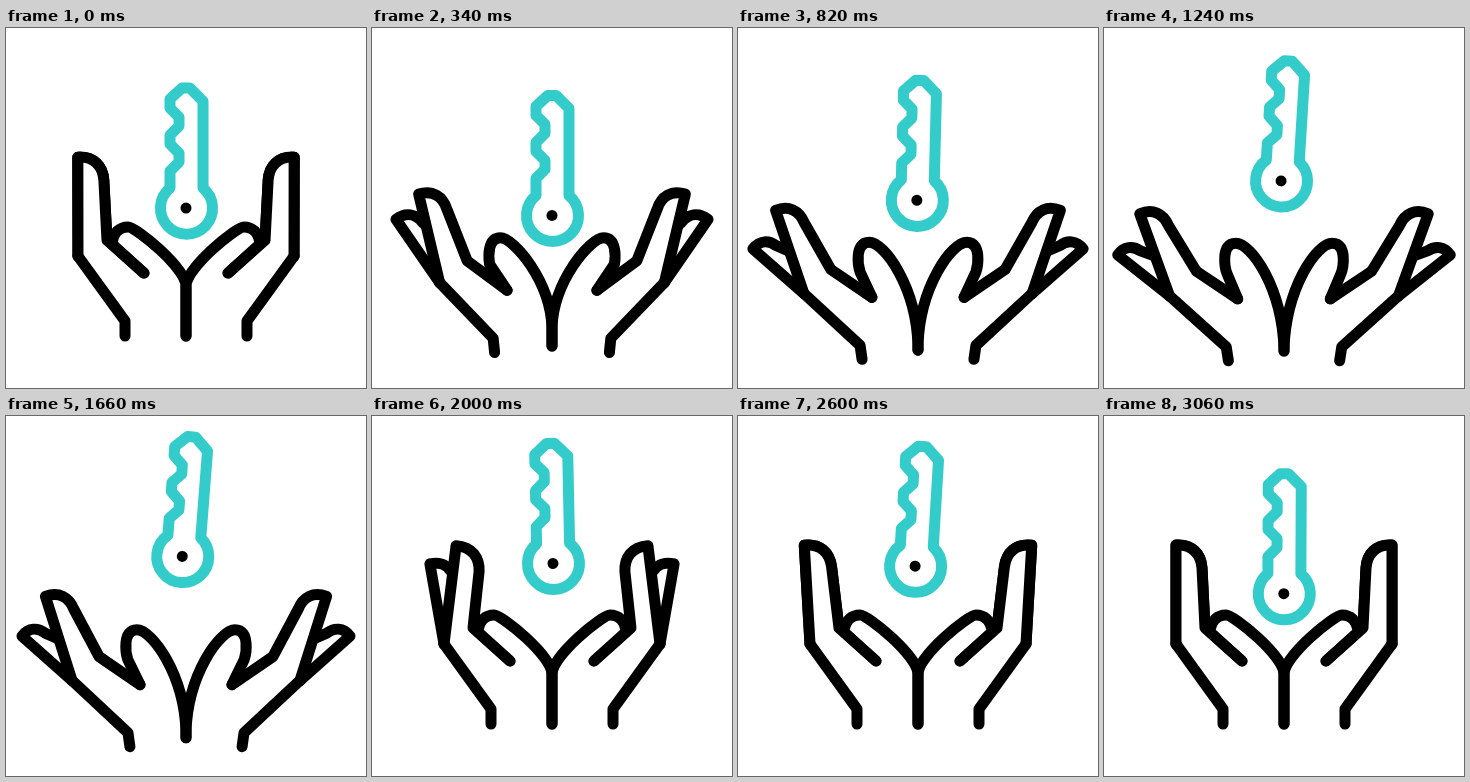
An HTML page for the animation above (3.08 s loop, 360 by 360 pixels).

```html
<!DOCTYPE html>
<html>
<head>
<meta charset="utf-8">
<style>
html, body { margin: 0; width: 100%; height: 100%; overflow: hidden; background: #fff; }
svg { display: block; width: 100vw; height: 100vh; }
path { fill: none; stroke: #000; stroke-width: 11; stroke-linecap: round; stroke-linejoin: round; }
#front { fill: #fff; }
#shape { stroke: #34cccb; }
</style>
</head>
<body>
<svg viewBox="0 0 360 360">
  <g id="hand"><path id="back"/><path id="front"/><path id="palm"/></g>
  <use href="#hand" transform="matrix(-1 0 0 1 360 0)"/>
  <g id="key"><path id="shape"/><circle cx="180" cy="180" r="5.5"/></g>
</svg>
<script>
const LOOP = 3080;
const $ = id => document.getElementById(id);
const set = (id, d) => $(id).setAttribute("d", d);

const teeth = "l9-9v-9l-9-9v-9".repeat(2);
set("shape", `M164 160V143${teeth}L176 60H184L197 73V160A26 26 0 1 1 164 160Z`);

// Left hand, each point as [x, y] when closed and [x, y] when open
const joints = {
  end: [119, 308, 124, 331],
  wrist: [119, 293, 122, 317],
  knuckle: [72, 228, 66, 265],
  base: [101, 212, 93, 241],
  web: [138, 245, 134, 269],
  thumb: [106, 216, 122, 244],
  thumbSide: [107, 204, 120, 238],
  thumbLead: [114, 199, 116, 214],
  thumbTop: [122, 199, 131, 214],
  inner: [180, 240, 178, 258],
  crotch: [180, 258, 180, 316],
  heel: [180, 308, 180, 322]
};
// Fingertip curve relative to the knuckle
const tip = [[0, -99], [16, -100], [25, -90], [26, -76]];

function finger([x, y], degrees, scale) {
  const a = degrees * Math.PI / 180, c = Math.cos(a) * scale, s = Math.sin(a) * scale;
  const [first, ...curve] = tip.map(([u, v]) => [x + u * c - v * s, y + u * s + v * c]);
  return `M${x} ${y}L${first}C${curve.join(" ")}`;
}

function draw(t) {
  const part = (a, b) => Math.min(1, Math.max(0, (t - a) / (b - a)));
  const ramp = (a, b) => { const x = part(a, b); return x * x * (3 - 2 * x); };
  const fall = (a, b) => 1 - Math.cos(part(a, b) * Math.PI / 2);

  const open = 1.1 * (1 - Math.exp(-t / 320)) * (1 - ramp(1580, 2000));
  const settle = 3.5 * ramp(2560, 2860);
  const frontTurn = -18.5 * open + 7 * ramp(1580, 2000) - 10.5 * ramp(2100, 2500) + settle;
  const backTurn = -48 * open - 10 * ramp(1580, 2000) + 6.5 * ramp(2150, 2550) + settle;
  const spread = Math.max(0, frontTurn - backTurn);

  const p = {};
  for (const [name, [x, y, x2, y2]] of Object.entries(joints))
    p[name] = [x + (x2 - x) * open, y + (y2 - y) * open];

  set("back", `${finger(p.knuckle, backTurn, 1 - .0105 * spread)}L${p.base}`);
  set("front", `${finger(p.knuckle, frontTurn, 1 - .11 * open)}L${p.base} ${p.web}`);
  set("palm", `M${p.end}L${p.wrist} ${p.knuckle}M${p.web}L${p.thumb}` +
    `C${p.thumbSide} ${p.thumbLead} ${p.thumbTop}S${p.inner} ${p.crotch}L${p.heel}`);

  const y = 8 * Math.sin(part(0, 240) * Math.PI / 2) - 48 * ramp(240, 1760)
    + 13 * ramp(1760, 2200) - 3 * ramp(2200, 2700) + 30 * fall(2700, LOOP);
  const tilt = 4.5 * ramp(340, 1640) - 8 * ramp(1640, 2200)
    + 7.2 * ramp(2200, 2650) - 3.7 * fall(2650, LOOP);
  $("key").setAttribute("transform", `translate(0 ${y}) rotate(${tilt} 180 132)`);
}

const start = performance.now();
function tick() {
  draw((performance.now() - start) % LOOP);
  requestAnimationFrame(tick);
}
tick();
</script>
</body>
</html>
```
